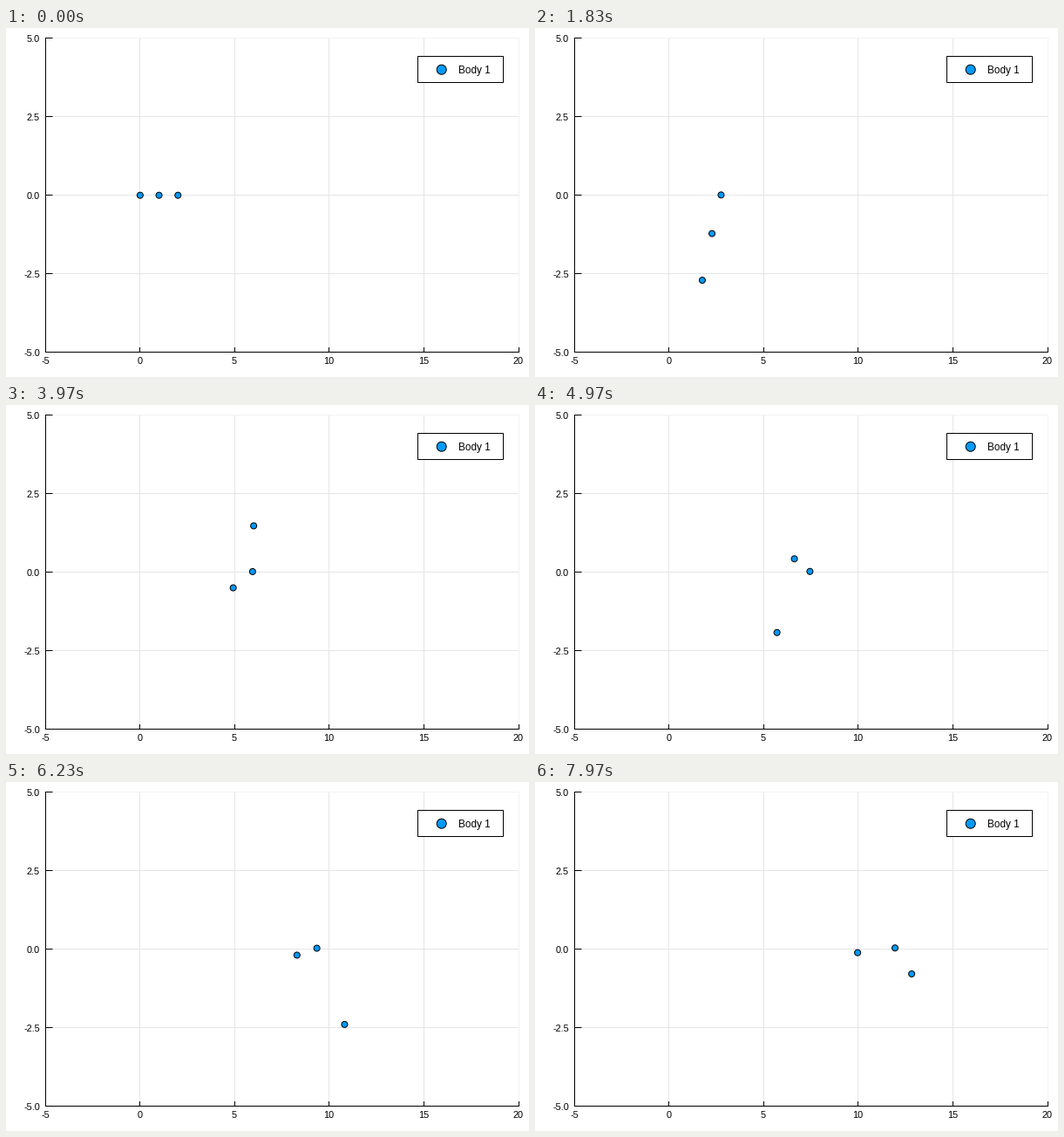
A matplotlib script that plays this animation: 600 px wide and 400 px high, repeating every 8 s.

```python
import numpy as np
import matplotlib.pyplot as plt
from matplotlib.animation import FuncAnimation
from matplotlib.patches import Circle, Rectangle

W, H, DPI = 600, 400, 100
PX = 72 / DPI                     # one pixel in points
FPS, LOOP, INTERVAL = 30, 8000, 20
STEPS = LOOP * FPS // 1000

GM = 36.55
STAR_V = np.array([1.4985, 0.0052])
BLUE = "#009afa"

plt.rcParams["font.family"] = "Liberation Sans"


def to_px(x, y):
    return 45.3 + 21.71 * (x + 5), 371.7 - 36 * (y + 5)


def orbits(sub=60):
    """Leapfrog the two planets around the star, one row per step."""
    pos = np.array([[1.0, 0.0], [2.0, 0.0]])
    vel = np.array([[-1.5, 6.0725], [-1.5, 4.237]])
    dt = 1 / (FPS * sub)

    def pull(p):
        return -GM * p / np.linalg.norm(p, axis=1, keepdims=True) ** 3

    path = [pos.copy()]
    for _ in range(STEPS - 1):
        for _ in range(sub):
            vel += pull(pos) * dt / 2
            pos += vel * dt
            vel += pull(pos) * dt / 2
        path.append(pos.copy())
    return np.array(path)


star = np.arange(STEPS)[:, None] / FPS * STAR_V
planets = orbits() + star[:, None, :]
bodies = np.concatenate([star[:, None, :], planets], axis=1)

fig = plt.figure(figsize=(W / DPI, H / DPI), dpi=DPI, facecolor="white")
ax = fig.add_axes([0, 0, 1, 1])
ax.set_xlim(0, W)
ax.set_ylim(H, 0)
ax.axis("off")


def line(x0, y0, x1, y1, color="black", z=2):
    ax.plot([x0, x1], [y0, y1], color=color, lw=PX, snap=False,
            solid_capstyle="butt", zorder=z)


def label(x, y, text, size=11, ha="center"):
    ax.text(x, y, text, fontsize=size * PX, ha=ha, va="baseline",
            color="black", zorder=6)


def dot(x, y, r, z):
    c = Circle((x, y), r, facecolor=BLUE, edgecolor="black", lw=PX, zorder=z)
    return ax.add_patch(c)


def mid(v):
    return np.floor(v) + 0.5


left, base = (mid(v) for v in to_px(-5, -5))
right, top = (mid(v) for v in to_px(20, 5))

for v in range(-5, 21, 5):
    x = to_px(v, 0)[0]
    edge = v == 20
    line(mid(x), top, mid(x), base, "#f2f2f2" if edge else "#e5e5e5", 1)
    line(mid(x), base, mid(x), base - 5.5)
    label(x - 0.4, 385, str(v))

for v in np.arange(-5, 5.1, 2.5):
    y = to_px(0, v)[1]
    edge = v == 5
    line(left, mid(y), right, mid(y), "#f2f2f2" if edge else "#e5e5e5", 1)
    line(left, mid(y), left + 8, mid(y))
    label(39, y + 4.1, f"{v:.1f}", ha="right")

line(left, top - 0.5, left, base + 0.5)
line(left - 0.5, base, right + 0.5, base)

ax.add_patch(Rectangle((472.5, 32.5), 98, 30, facecolor="white",
                       edgecolor="black", lw=PX, snap=False, zorder=4))
dot(499.7, 47.7, 5.5, 5)
label(518.6, 52, "Body 1", 11.7, "left")

dots = [dot(*to_px(*p), 3.5, 3) for p in bodies[0]]


def update(k):
    step = min((k * INTERVAL + 14) * FPS // 1000, STEPS - 1)
    for d, p in zip(dots, bodies[step]):
        d.center = to_px(*p)
    return dots


anim = FuncAnimation(fig, update, frames=LOOP // INTERVAL, interval=INTERVAL,
                     init_func=lambda: update(0), repeat=True, repeat_delay=0)
plt.show()
```
